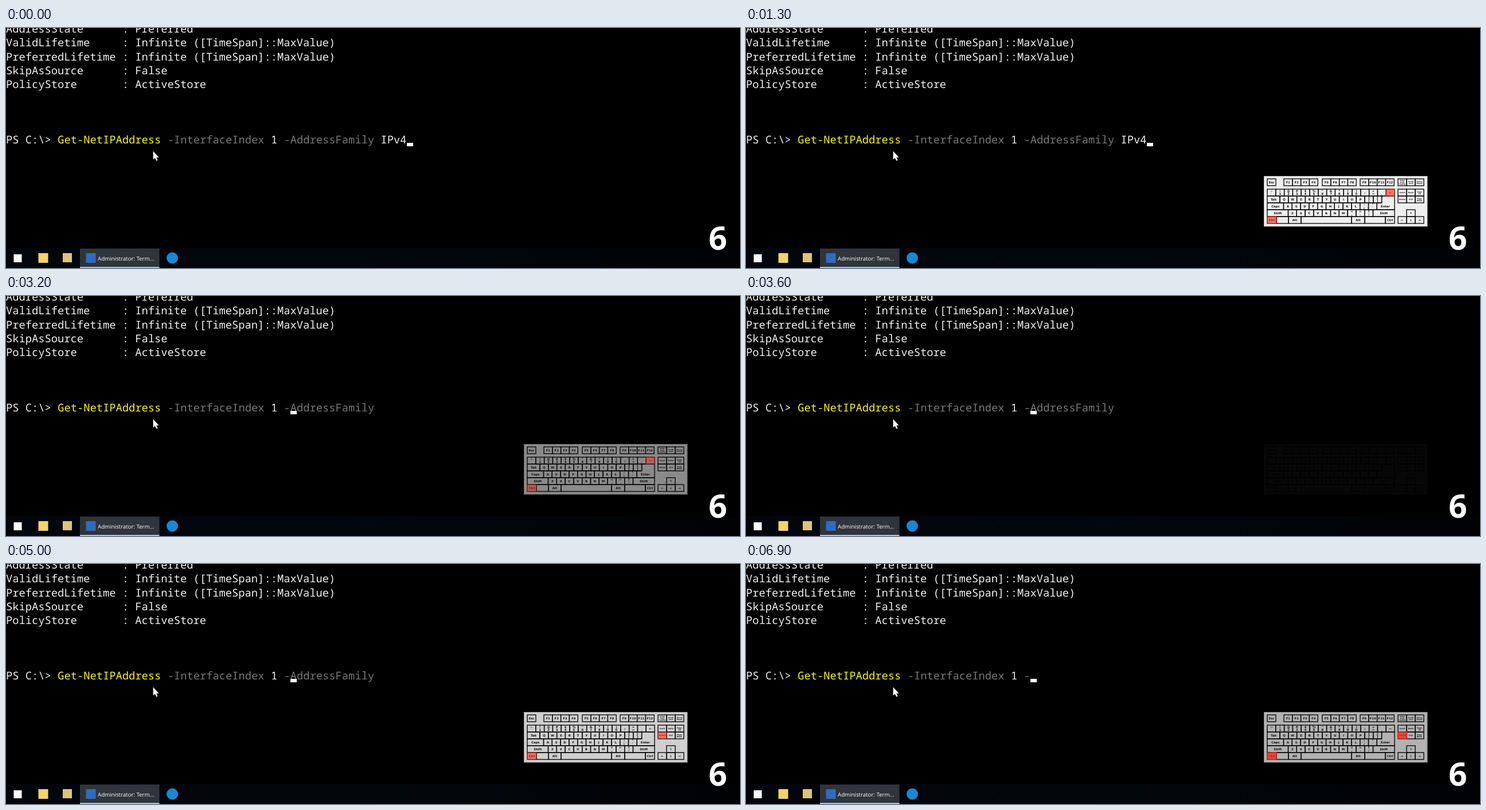
Animation of 1280x420 px, one loop 7000 ms. Source, as an HTML page:

```html
<!DOCTYPE html>
<html lang="en">
<head>
<meta charset="utf-8">
<title>Deleting words in the console</title>
<style>
html, body { margin: 0; width: 100%; height: 100%; overflow: hidden; background: #000; }
svg { display: block; width: 1280px; height: 420px; }
text { white-space: pre; text-rendering: geometricPrecision; }

.console { font: 18.78px "Noto Sans Mono", monospace; fill: #f0f0f0; }
.console .command { fill: #f8f03a; }
.console .option { fill: #777; }
.title { font: 9.7px "Open Sans", sans-serif; fill: #fff; }
.number { font: bold 56.5px "Open Sans", sans-serif; fill: #fff; text-anchor: middle; }
.key { fill: none; stroke: #111; stroke-width: 1.4; }
.label { font: bold 5.2px "DejaVu Sans", sans-serif; fill: #111; text-anchor: middle; }
.tiny { font-size: 3px; }
.pressed rect { fill: #ec2a18; fill-opacity: .75; stroke: #dc3020; stroke-width: 1.3; }

.value, .parameter, .cursor, .board, .pressed, .backspace, .delete {
  animation: 7s step-end infinite;
}
.value { animation-name: value; }
.parameter { animation-name: parameter; }
.cursor { animation-name: cursor; }
.board { animation-name: board; }
.pressed { animation-name: pressed; }
.backspace { animation-name: backspace; }
.delete { animation-name: delete; }

@keyframes value { 0% { opacity: 1 } 21.428%, 100% { opacity: 0 } }
@keyframes parameter { 0% { opacity: 1 } 75.714%, 100% { opacity: 0 } }
@keyframes backspace { 0% { opacity: 1 } 57%, 100% { opacity: 0 } }
@keyframes delete { 0% { opacity: 0 } 57%, 100% { opacity: 1 } }
@keyframes cursor {
  0% { transform: translateX(699px) }
  21.428% { transform: translateX(654px) }
  45.714%, 100% { transform: translateX(496px) }
}
@keyframes board {
  0% { opacity: 0 }
  8.571% { opacity: .06; animation-timing-function: steps(8, jump-none) }
  19.999% { opacity: .94 }
  20% { opacity: 1 }
  41.428% { opacity: .93; animation-timing-function: steps(8, jump-none) }
  52.857% { opacity: .03 }
  62.857% { opacity: .06; animation-timing-function: steps(8, jump-none) }
  74.284% { opacity: .94 }
  74.285% { opacity: 1 }
  95.714% { opacity: .95; animation-timing-function: steps(3, jump-none) }
  100% { opacity: .7 }
}
@keyframes pressed {
  0% { opacity: 0 }
  8.571% { opacity: .06; animation-timing-function: steps(8, jump-none) }
  20% { opacity: .8 }
  38.571% { opacity: .9 }
  41.428% { opacity: 1; animation-timing-function: steps(8, jump-none) }
  52.857% { opacity: 0 }
  62.857% { opacity: .06; animation-timing-function: steps(8, jump-none) }
  74.285% { opacity: .8 }
  94.285% { opacity: .9 }
  95.714%, 100% { opacity: 1 }
}
</style>
</head>
<body>
<svg viewBox="0 0 1280 420">
  <defs>
    <linearGradient id="bar">
      <stop offset="0" stop-color="#02050b"/>
      <stop offset=".5" stop-color="#02060d"/>
      <stop offset="1" stop-color="#010204"/>
    </linearGradient>
  </defs>
  <rect width="1280" height="420"/>

  <g id="console" class="console"></g>
  <rect class="cursor" y="201" width="11" height="6" fill="#fff"/>
  <path d="M256.600 215.500v14.600l3.200-2.700 2.500 5 2.300-1.100-2.400-4.800h4.400z" fill="#fff"/>

  <rect y="385" width="1280" height="35" fill="url(#bar)"/>
  <rect x="129" y="386" width="138.500" height="34" fill="#30343c"/>
  <rect x="129" y="418" width="138.500" height="2" fill="#a9c3da"/>
  <rect x="13.500" y="396" width="14" height="14" fill="#fff"/>
  <rect x="56.500" y="394" width="17" height="17" fill="#f3d270"/>
  <rect x="99" y="394" width="16" height="16" fill="#dcc47c"/>
  <rect x="139.500" y="394" width="17" height="17" fill="#2f6cc0"/>
  <circle cx="290" cy="402.500" r="10" fill="#1c86d1"/>
  <text class="title" x="160" y="407">Administrator: Term...</text>

  <g id="board" class="board">
    <rect x="903.500" y="259.500" width="284.500" height="87.500" fill="#fff" stroke="#ccc"/>
  </g>
  <g class="pressed">
    <rect x="909" y="330" width="16" height="12"/>
    <rect class="backspace" x="1115.500" y="282" width="15.500" height="12"/>
    <rect class="delete" x="1137" y="294" width="15.500" height="12"/>
  </g>

  <text class="number" x="1241.500" y="388">6</text>
</svg>
<script>
const SVG = 'http://www.w3.org/2000/svg';
const CELL = 11.268, ROW = 24.25, UNIT = 14.8, KEY_H = 12, LEFT = 909, NAV = 1137;
const consoleGroup = document.getElementById('console');
const board = document.getElementById('board');

function add(parent, tag, attrs, content = '') {
  const el = document.createElementNS(SVG, tag);
  for (const name in attrs) el.setAttribute(name, attrs[name]);
  el.textContent = content;
  parent.append(el);
}

function print(row, col, content, cls = '') {
  add(consoleGroup, 'text', { x: col * CELL, y: 8 + row * ROW, class: cls }, content);
}

// A label may hold several lines separated by "|".
function key(x, y, width, label = '', tiny = false) {
  add(board, 'rect', { x, y, width, height: KEY_H, class: 'key' });
  const lines = label.split('|');
  const gap = tiny ? 3.1 : 5;
  lines.forEach((line, i) => add(board, 'text', {
    x: x + width / 2,
    y: y + KEY_H / 2 + (tiny ? 1.1 : 1.9) + (i - (lines.length - 1) / 2) * gap,
    class: tiny ? 'label tiny' : 'label'
  }, line));
}

function keys(x, y, labels, tiny = false, width = UNIT) {
  labels.forEach((label, i) => key(x + i * width, y, width, label, tiny));
}

[
  ['AddressState', 'Preferred'],
  ['ValidLifetime', 'Infinite ([TimeSpan]::MaxValue)'],
  ['PreferredLifetime', 'Infinite ([TimeSpan]::MaxValue)'],
  ['SkipAsSource', 'False'],
  ['PolicyStore', 'ActiveStore']
].forEach(([name, value], row) => print(row, 0, name.padEnd(18) + ': ' + value));

print(8, 0, 'PS C:\\>');
print(8, 8, 'Get-NetIPAddress', 'command');
print(8, 25, '-InterfaceIndex', 'option');
print(8, 41, '1');
print(8, 43, '-', 'option');
print(8, 44, 'AddressFamily', 'option parameter');
print(8, 58, 'IPv4', 'value');

key(LEFT, 264, 15, 'Esc');
[938, 1005, 1071].forEach((x, block) =>
  keys(x, 264, [1, 2, 3, 4].map(n => 'F' + (block * 4 + n))));

keys(LEFT, 282, ['~|`', '!|1', '@|2', '#|3', '$|4', '%|5', '^|6', '&|7', '*|8', '(|9', ')|0', '_|-', '+|=', '||\\', '←']);
key(LEFT, 294, 22, 'Tab');
keys(931, 294, [...'QWERTYUIOP', '{|[', '}|]']);
key(LEFT, 306, 28.5, 'Caps');
keys(937.5, 306, [...'ASDFGHJKL', ':|;', '"|\'']);
add(board, 'path', { d: 'M1108.6 294H1131V318H1100.3V306H1108.6Z', class: 'key' });
add(board, 'text', { x: 1115, y: 313.9, class: 'label' }, 'Enter');
key(LEFT, 318, 36.5, 'Shift');
keys(945.5, 318, [...'ZXCVBNM', '<|,', '>|.', '?|/']);
key(1093.5, 318, 37.5, 'Shift');

[[16, 'Ctrl'], [21, ''], [22, 'Alt'], [88, ''], [23, 'Alt'], [36, ''], [16, 'Ctrl']]
  .reduce((x, [width, label]) => (key(x, 330, width, label), x + width), LEFT);

keys(NAV, 264, ['Print|Scrn|SysRq', 'Scroll|Lock', 'Pause|Break'], true, 15);
keys(NAV, 282, ['Insert', 'Home', 'Page|Up'], true, 15);
keys(NAV, 294, ['Delete', 'End', 'Page|Down'], true, 15);
key(NAV + 15, 318, 15, '↑');
keys(NAV, 330, ['←', '↓', '→'], false, 15);
</script>
</body>
</html>
```
